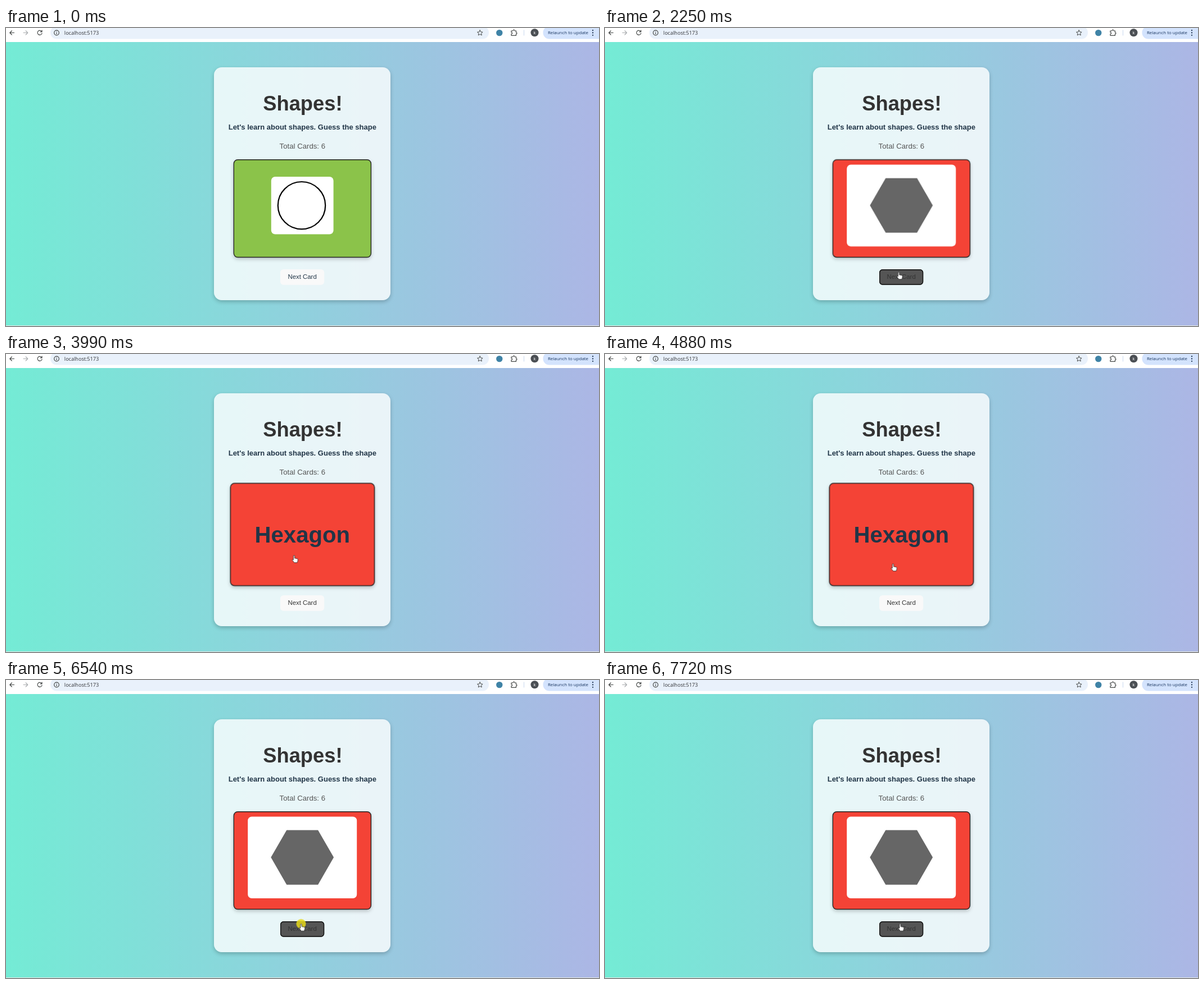
An HTML page for the animation above (8 s loop, 1055 by 531 pixels).

```html
<!DOCTYPE html>
<html lang="en">
<head>
<meta charset="utf-8">
<title>Shapes!</title>
<style>
  html, body { margin: 0; width: 100%; height: 100%; overflow: hidden; background: #fff; }
  .stage { position: relative; width: 1055px; height: 531px; overflow: hidden; background: #fff; }
  .page { position: absolute; top: 25px; width: 1055px; height: 505px;
    background: linear-gradient(to right, #74ebd5, #acb6e5); }
  .panel { position: absolute; left: 370.3px; top: 45.3px; width: 313.8px; height: 414.7px;
    border-radius: 14px; background: rgba(255, 255, 255, .8); box-shadow: 0 3px 7px rgba(0, 0, 0, .22); }
  .floor { position: absolute; top: 530px; width: 100%; height: 1px; background: #e4e8e4; }
  svg { position: absolute; left: 0; top: 0; }
  text { font-family: "Liberation Sans", Arial, sans-serif; text-anchor: middle; }
  .bold { font-weight: 700; fill: #213547; }
  .chrome text { font-family: "Open Sans", sans-serif; }
  .line { fill: none; stroke: #444746; stroke-width: 1.2; stroke-linecap: round; stroke-linejoin: round; }

  .anim { animation: 8s step-end infinite; }
  .card { transform-origin: 527.35px 321.6px; animation-name: hover-card; }
  .face { stroke: #242424; stroke-width: 1.4; filter: drop-shadow(0 3px 3px rgba(0, 0, 0, .2)); animation-name: face; }
  .circle { animation-name: circle; }
  .hexagon { animation-name: hexagon; }
  .answer { animation-name: answer; }
  .button { animation-name: button; }
  .caption { animation-name: caption; }
  .focus { animation-name: focus; }
  .pointer { animation-name: move; }
  .arrow { animation-name: arrow; }
  .hand { animation-name: hand; }
  .click { animation-name: click; }

  @keyframes face {
    0%, 84.25% { fill: #8bc34a; }
    28.125%, 96.5%, 100% { fill: #f44336; }
  }
  @keyframes circle {
    0%, 84.25% { opacity: 1; }
    28.125%, 96.5%, 100% { opacity: 0; }
  }
  @keyframes hexagon {
    0%, 49.875%, 84.25% { opacity: 0; }
    28.125%, 67.625%, 96.5%, 100% { opacity: 1; }
  }
  @keyframes answer {
    0%, 67.625%, 100% { opacity: 0; }
    49.875% { opacity: 1; }
  }
  @keyframes hover-card {
    0% { transform: scale(1); }
    39.875% { transform: scale(1); animation-timing-function: steps(4); }
    43.25% { transform: scale(1.05); }
    76.75% { transform: scale(1.05); animation-timing-function: steps(4); }
    80.125%, 100% { transform: scale(1); }
  }
  @keyframes button {
    0% { fill: #f9f9f9; }
    9.875% { fill: #f9f9f9; animation-timing-function: steps(3); }
    12.375% { fill: #555; }
    38.25% { fill: #555; animation-timing-function: steps(4); }
    41.625% { fill: #f9f9f9; }
    78.375% { fill: #f9f9f9; animation-timing-function: steps(3); }
    80.875%, 100% { fill: #555; }
  }
  @keyframes caption {
    0% { fill: #213547; }
    12.375%, 100% { fill: #333; }
  }
  @keyframes focus {
    0%, 47.375% { opacity: 0; }
    25.75%, 81.75%, 100% { opacity: 1; }
  }
  @keyframes move {
    0% { transform: translate(680px, 514px); }
    7.25% { transform: translate(680px, 514px); animation-timing-function: steps(6); }
    12.375% { transform: translate(528.5px, 434px); animation-timing-function: steps(4); }
    15.75% { transform: translate(522.5px, 435px); }
    38.25% { transform: translate(522.5px, 435px); animation-timing-function: steps(6, jump-both); }
    43.25% { transform: translate(512.5px, 359px); }
    54% { transform: translate(512.5px, 359px); animation-timing-function: steps(4, jump-both); }
    57.5% { transform: translate(522px, 412px); animation-timing-function: steps(5); }
    61.875% { transform: translate(510px, 364.5px); }
    72.5% { transform: translate(510px, 364.5px); animation-timing-function: steps(9, jump-both); }
    80.125%, 100% { transform: translate(525px, 434.5px); }
  }
  @keyframes arrow {
    0%, 11.5%, 100% { opacity: 0; }
    7.25% { opacity: 1; }
  }
  @keyframes hand {
    0% { opacity: 0; }
    11.5%, 100% { opacity: 1; }
  }
  @keyframes click {
    0%, 28.125%, 49.875%, 67.625%, 84.25%, 96.5%, 100% { opacity: 0; }
    25.75%, 47.375%, 65.125%, 81.75%, 93.25% { opacity: 1; }
  }
</style>
</head>
<body>
<div class="stage">
  <div class="page"><div class="panel"></div></div>
  <div class="floor"></div>
  <svg width="1055" height="531" viewBox="0 0 1055 531">
    <g class="chrome">
      <rect x="79" y="-3" width="780" height="22.5" rx="11" fill="#e9f1fb"/>
      <path class="line" d="M14.5 8.5H6.8M10.3 5 6.8 8.5l3.5 3.5"/>
      <path class="line" style="stroke:#a9abae" d="M31 8.5h7.7M35.200 5l3.500 3.500-3.500 3.500"/>
      <path class="line" d="M63.500 6.200A4 4 0 1 0 64 9.300M64 4v2.800h-2.800"/>
      <circle class="line" cx="90" cy="8.500" r="4.300" stroke-width="1"/>
      <path class="line" d="M90 8.300v2.200M90 6.400v.1"/>
      <text x="134.500" y="12.200" font-size="9.100" fill="#303236">localhost:5173</text>
      <path class="line" style="stroke-width:1" d="M843.300 3.800l1.400 3.100 3.400.4-2.500 2.300.7 3.300-3-1.700-3 1.700.7-3.300-2.500-2.300 3.400-.4z"/>
      <circle cx="877.800" cy="8.600" r="5.700" fill="#3f83a6"/>
      <path class="line" d="M899 5h3c0-2.600 3-2.600 3 0h2.500v3c2 0 2 2.600 0 2.600V13.300H899v-2.700c2.200 0 2.200-2.900 0-2.900z"/>
      <path d="M921.500 3.500v10" stroke="#c9d8ee"/>
      <circle cx="940.500" cy="8.200" r="7" fill="#4b4f54"/>
      <text x="940.500" y="11" font-size="7.500" fill="#fff">k</text>
      <rect x="955.500" y="-3" width="115" height="22.500" rx="11" fill="#d3e3fd"/>
      <text x="1000" y="11.300" font-size="7.950" fill="#17345f">Relaunch to update</text>
      <path d="M1044 4.200v0M1044 8.500v0M1044 12.800v0" stroke="#1f3350" stroke-width="2.300" stroke-linecap="round"/>
    </g>

    <text x="527.900" y="147" font-size="36.300" font-weight="700" fill="#333">Shapes!</text>
    <text class="bold" x="527.300" y="181.400" font-size="13">Let's learn about shapes. Guess the shape</text>
    <text x="527.300" y="214.500" font-size="13.200" fill="#555">Total Cards: 6</text>

    <g class="anim card">
      <rect class="anim face" x="405.300" y="234.700" width="244.100" height="173.800" rx="7"/>
      <g class="anim circle">
        <rect x="471.800" y="265" width="110.800" height="102.500" rx="7" fill="#fff"/>
        <circle cx="526" cy="316.200" r="42.200" fill="none" stroke="#000" stroke-width="2.200"/>
      </g>
      <g class="anim hexagon">
        <rect x="430.200" y="243.500" width="194" height="145.600" rx="7" fill="#fff"/>
        <path d="M471.300 316.100l28-48.600h55.800l28 48.600-28 48.600h-55.800z" fill="#666"/>
      </g>
      <text class="anim bold answer" x="527.300" y="335.400" font-size="38.200">Hexagon</text>
    </g>

    <rect class="anim button" x="488" y="430" width="78.200" height="27.700" rx="5.600"/>
    <rect class="anim focus" x="488.700" y="430.700" width="76.800" height="26.300" rx="5" fill="none" stroke="#101010" stroke-width="1.400"/>
    <text class="anim caption" x="527.100" y="447.400" font-size="11.400">Next Card</text>

    <g class="anim pointer">
      <circle class="anim click" r="8.600" fill="#e6d81a" fill-opacity=".85"/>
      <g fill="#fff" stroke="#222" stroke-width=".8" stroke-linejoin="round">
        <path class="anim arrow" d="M0 0v11l2.600-2.300 1.600 3.600 1.600-.7L4.200 8h3.400z"/>
        <path class="anim hand" d="M-1.100 1Q-1.100-.2 0-.2T1.100 1V4.800L5.600 5.700Q6.800 6 6.800 7.400V9L5.500 12.800H.3L-3.100 8.200Q-3.400 6.800-2.200 6.900L-1.100 7.900z"/>
      </g>
    </g>
  </svg>
</div>
</body>
</html>
```
